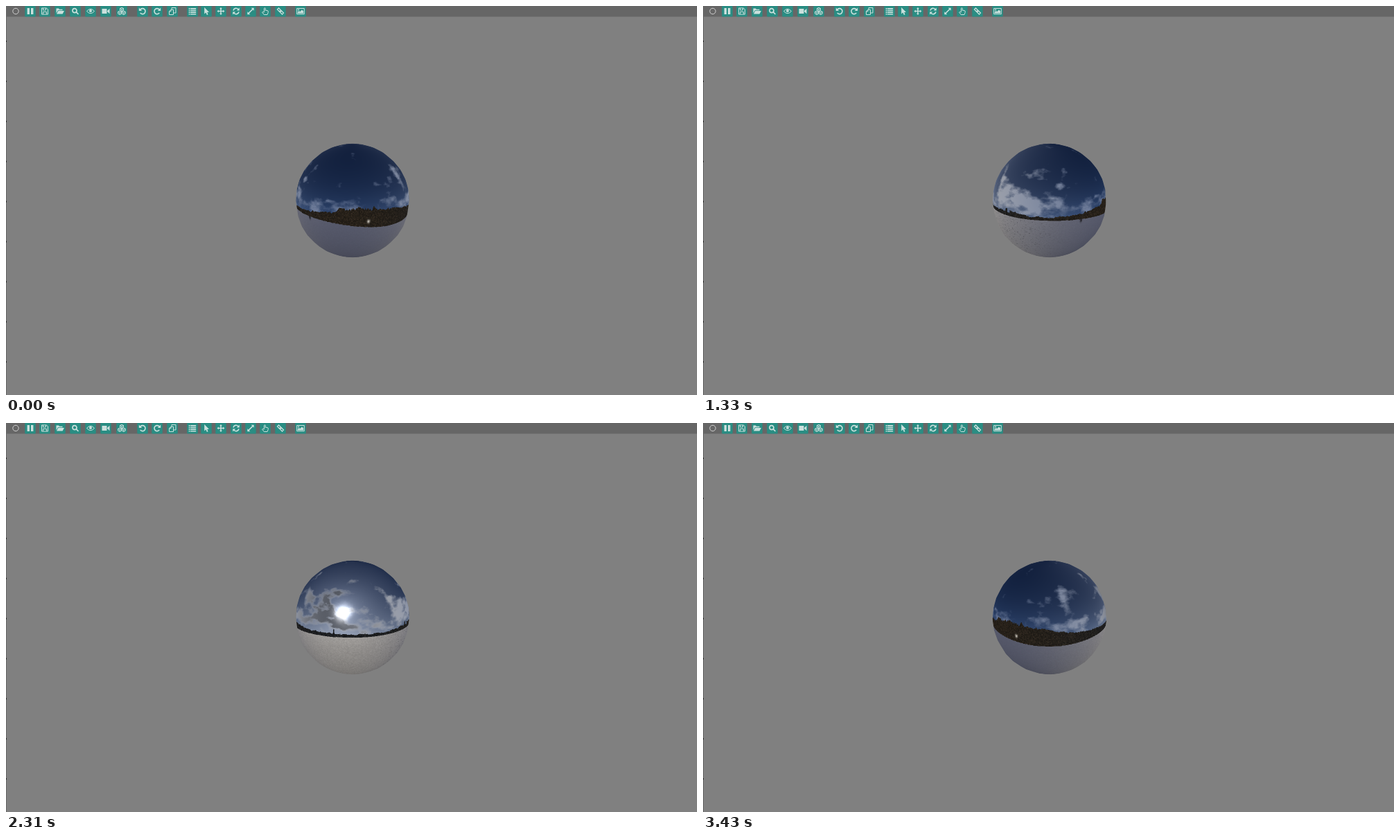
Animation of 997 by 562 pixels, one loop 3500 ms. Source, as an HTML page with a canvas:

```html
<!DOCTYPE html>
<html lang="en">
<head>
<meta charset="utf-8">
<title>Panorama ball</title>
<style>
html, body { margin: 0; width: 100%; height: 100%; overflow: hidden; background: #808080; }
svg, canvas { position: absolute; display: block; }
svg { left: 0; top: 0; }
canvas { left: 416px; top: 197px; }
</style>
</head>
<body>
<svg id="ui" width="997" height="562" viewBox="0 0 997 562">
  <rect width="997" height="15.5" fill="#666"/>
  <rect width="1" height="562" fill="#696969"/>
  <circle cx="14" cy="7.5" r="4.2" fill="none" stroke="#d0d0d0"/>
</svg>
<canvas id="ball" width="168" height="168"></canvas>
<script>
const LOOP = 3500, STEP = 70, RAD = Math.PI / 180;

// ---------- toolbar ----------
const ui = document.getElementById('ui');
const add = (parent, tag, attrs) => {
  const el = document.createElementNS('http://www.w3.org/2000/svg', tag);
  for (const k in attrs) el.setAttribute(k, attrs[k]);
  return parent.appendChild(el);
};
function icon(x, line, fill = '', weight = 1, flip = 1) {
  add(ui, 'rect', { x: x - 7.75, y: 0, width: 15.5, height: 15.5, rx: 1, fill: '#2a8d83' });
  const g = add(ui, 'g', { transform: `translate(${x} 7.5) scale(${flip} 1)` });
  add(g, 'path', { d: line, fill: 'none', stroke: '#cbe0dd', 'stroke-width': weight });
  add(g, 'path', { d: fill, fill: '#cbe0dd' });
}
const dot = (x, y, r) => `M${x - r} ${y}a${r} ${r} 0 1 1 ${2 * r} 0a${r} ${r} 0 1 1 ${-2 * r} 0`;
const cube = (x, y) => `M${x} ${y - 2.6}l2.5 1.2v2.8l-2.5 1.2l-2.5-1.2v-2.8zM${x - 2.5} ${y - 1.4}l2.5 1.2l2.5-1.2M${x} ${y}v2.6`;
const listRow = y => `M-5.3 ${y}h1.8v1.6h-1.8zM-2.8 ${y}h8v1.6h-8z`;
const arc = 'M-3.2-2.3A4 4 0 1 1-3.2 2.5', arcTip = 'M-5.2-5v4.4h4.4z';

icon(35, '', 'M-4.4-4.5h3.4v9h-3.4zM1-4.5h3.4v9H1z');
icon(56, 'M-4.5-4.5h7l2 2v7h-9zM-2.5-4.5v3h4v-3M-2.5 4.5V1h5v3.5');
icon(78, '', 'M-5.5-4h3.5l1 1.2h4.5v1.6H-3L-5.5 3zM-2.6-.6H6L3.6 4H-5z');
icon(100, dot(-1, -.8, 3) + 'M1.4 1.4L4.5 4.5', '', 1.7);
icon(122, 'M-5.5 0Q0-6.4 5.5 0Q0 6.4-5.5 0z', dot(0, -.4, 2));
icon(144, '', 'M-5.5-3.5h7v7h-7zM2-.6L5.5-3.7v7.4L2 .6z');
icon(167, cube(0, -2.6) + cube(-2.8, 2.3) + cube(2.8, 2.3));
icon(197, arc, arcTip, 1.6);
icon(218, arc, arcTip, 1.6, -1);
icon(240, 'M-1-2.5V-5H5V2.5H1.5M-2-2.2h3.5V5h-6V.3zM-2-2.2V.3h-2.5');
icon(269, '', [-4.4, -1.8, .8, 3.4].map(listRow).join(''));
icon(289, '', 'M-2.8-5.5V4L-.5 2L.9 5.4l1.7-.7L1.2 1.4H4z');
icon(310, 'M-4 0H4M0-4V4', 'M0-5.5l2 2.3h-4zM0 5.5l2-2.3h-4zM-5.5 0l2.3-2v4zM5.5 0L3.2-2v4z', 1.5);
icon(332, 'M-4-1A4 4 0 0 1 3-2.8M4 1A4 4 0 0 1-3 2.8', 'M4.8-5v4H.8zM-4.8 5V1h4z', 1.6);
icon(353, 'M-3 3L3-3', 'M4.7-4.7v4L.7-4.7zM-4.7 4.7v-4l4 4z', 1.7);
icon(374, 'M-1.5 1V-4.2q.9-1.2 1.8 0V-1Q1-2 2-.8Q3-1.5 4.2-.3V2L3 5H-1.7L-4.4 1.6Q-3.8 0-1.5 1.6');
icon(396, 'M-4.5-2.5l2-2l3 3l-2 2zM-.5 1.5l2-2l3 3l-2 2z', '', 1.3);
icon(425, 'M-5.3-4H5.3V4.2H-5.3z', 'M-4.2 3V1.2L-2.2-.6L-.8.8L2-2L4.2.2V3z' + dot(-2.8, -2, 1));
for (let y = 50; y < 562; y += 57.9) add(ui, 'rect', { x: 0, y, width: 1, height: 2, fill: '#222' });

// ---------- helpers ----------
const clamp = (v, a = 0, b = 1) => Math.min(b, Math.max(a, v));
const lerp = (a, b, t) => a + (b - a) * t;
const mix = (a, b, t) => a.map((v, i) => lerp(v, b[i], t));
const fade = t => t * t * (3 - 2 * t);
const wrap = d => ((d + 540) % 360 + 360) % 360 - 180;
// smooth hill of height 1 around a direction
const bump = (angle, mid, width) => Math.exp(-((wrap(angle - mid) / width) ** 2));

function hash(x, y, z) {
  let h = Math.imul(x, 374761393) ^ Math.imul(y, 668265263) ^ Math.imul(z, 1442695041);
  h = Math.imul(h ^ h >>> 13, 1274126177);
  return ((h ^ h >>> 16) >>> 0) / 4294967296;
}
function noise(x, y, z) {
  const i = Math.floor(x), j = Math.floor(y), k = Math.floor(z);
  const a = fade(x - i), b = fade(y - j), c = fade(z - k);
  const row = (q, r) => lerp(hash(i, q, r), hash(i + 1, q, r), a);
  return lerp(lerp(row(j, k), row(j + 1, k), b), lerp(row(j, k + 1), row(j + 1, k + 1), b), c);
}
function fbm(x, y, z) {
  let sum = 0, amp = .5;
  for (let o = 0; o < 5; o++, amp /= 2) {
    sum += amp * noise(x, y, z);
    x = x * 2 + 7; y = y * 2 + 3; z = z * 2 + 5;
  }
  return sum / .96875;
}

// ---------- panorama, angles in degrees ----------
const sun = { lon: 172, lat: 20 };
const bigClouds = [
  { lon: 149, lat: 38, w: 18, h: 9 }, { lon: 154, lat: 22, w: 16, h: 8 },
  { lon: 122, lat: 30, w: 13, h: 7 }, { lon: 108, lat: 56, w: 11, h: 6 }, { lon: 62, lat: 35, w: 7, h: 11 }
];

function cloudCover(lon, lat, day) {
  const bank = bump(lat, 9, 8) * (.5 + .35 * day);
  const streaks = .66 * bump(lon, 250, 48) * bump(lat, 23, 13);
  return bigClouds.reduce((sum, c) => sum + .95 * bump(lon, c.lon, c.w) * bump(lat, c.lat, c.h), bank + streaks);
}

function sky(lon, lat, n, day) {
  const zenith = mix([14, 27, 55], [29, 41, 68], day), low = mix([50, 74, 116], [106, 117, 138], day);
  let c = mix(zenith, low, Math.exp(-Math.max(lat, 0) / 24));
  const g = Math.hypot(wrap(lon - sun.lon) * Math.cos(lat * RAD), lat - sun.lat);
  const haze = 95 * Math.exp(-g / 25);
  c = c.map(v => v + haze);
  const thick = clamp((Math.min(cloudCover(lon, lat, day), 1) + (n - .5) * 2.4 - .4) * 1.8);
  const lit = mix([112, 126, 156], [185, 186, 190], day);
  const shade = bump(lon, 160, 42) * thick * thick;
  c = mix(c, mix(lit, [84, 87, 94], shade), thick * .88);
  const glare = 230 * Math.exp(-((g / (4.5 + 4 * n)) ** 2));
  return c.map(v => v + glare);
}

function snow(lon, lat, grain, rough, day) {
  let c = mix([88, 91, 109], [149, 146, 143], day);
  const glow = 16 * bump(lon, sun.lon, 40) * Math.exp(lat / 15);
  const k = (1 - .24 * clamp(-lat / 70)) * (1 + (grain - .5) * (.04 + .1 * day));
  const print = rough > .8 ? .5 * bump(lon, 255, 40) : 0;
  return mix(c.map(v => (v + glow) * k), [62, 62, 68], print);
}

function landTop(lon) {
  const wood = bump(lon, 10, 38);
  const trees = (noise(lon * .35, 2, 9) - .5) * (1 + 4 * wood) + (noise(lon * 1.1, 5, 3) - .5) * (.8 + 1.6 * wood);
  const city = 4.5 * hash(Math.floor(lon / 3), 4, 1) * bump(lon, 247, 14);
  const mast = 5 * bump(lon, 164, .5);
  return .5 + 8.5 * wood + trees + city + mast;
}
const landEnd = lon => -2.4 - 9 * bump(lon, 45, 62);

function land(lon, lat, grain, day) {
  const lamp = bump(lon, 14.6, 1.3) * bump(lat, -3.8, 1.6);
  const wood = mix(mix([28, 24, 19], [66, 54, 41], grain * grain), mix([20, 22, 25], [50, 52, 54], grain * grain), day);
  return mix(wood, [205, 200, 190], lamp);
}

const TW = 900, TH = 450, tex = new Uint8ClampedArray(TW * TH * 3);
for (let i = 0; i < TW; i++) {
  const lon = (i + .5) * 360 / TW, day = .5 + .5 * Math.cos((lon - sun.lon) * RAD);
  const top = landTop(lon), end = landEnd(lon);
  for (let j = 0; j < TH; j++) {
    const lat = 90 - (j + .5) * 180 / TH, r = Math.cos(lat * RAD);
    const x = r * Math.sin(lon * RAD), y = Math.sin(lat * RAD), z = r * Math.cos(lon * RAD);
    const grain = noise(x * 90, y * 90, z * 90);
    let c;
    if (lat > top) c = sky(lon, lat, fbm(x * 5, y * 8, z * 5), day);
    else if (lat > end) c = land(lon, lat, grain, day);
    else c = snow(lon, lat, grain, noise(x * 45, y * 110, z * 45), day);
    const walker = bump(lon, 316, 1) * bump(lat, -4.5, 2);
    tex.set(mix(c, [24, 23, 26], walker), (j * TW + i) * 3);
  }
}

// ---------- ball ----------
const R = 82.3, MID = 84, DIST = 8.3, TILT = 16 * RAD;
const CT = Math.cos(TILT), ST = Math.sin(TILT), ZOOM = Math.sqrt(DIST * DIST - 1);
const SIZE = 336;
const shot = document.createElement('canvas');
shot.width = shot.height = SIZE;
const shotCtx = shot.getContext('2d'), image = shotCtx.createImageData(SIZE, SIZE);
const ctx = document.getElementById('ball').getContext('2d');
ctx.imageSmoothingQuality = 'high';

// longitude and texture row seen by each pixel, before rotation
const rays = [];
for (let p = 0; p < SIZE * SIZE; p++) {
  const sx = ((p % SIZE + .5) / 2 - MID) / R / ZOOM, sy = ((Math.floor(p / SIZE) + .5) / 2 - MID) / R / ZOOM;
  const a = 1 + sx * sx + sy * sy, disc = DIST * DIST - a * (DIST * DIST - 1);
  if (disc < 0) continue;
  const q = (DIST - Math.sqrt(disc)) / a, X = sx * q, up = -sy * q, Z = DIST - q;
  const lat = Math.asin(up * CT + Z * ST), lon = Math.atan2(X, Z * CT - up * ST);
  rays.push({ p: p * 4, lon: lon / RAD, row: clamp(Math.floor((.5 - lat / Math.PI) * TH), 0, TH - 1) * TW });
}

function project(lon, lat) {
  const y = Math.sin(lat), z = Math.cos(lat) * Math.cos(lon);
  const k = R * ZOOM / (DIST - z * CT - y * ST);
  return [MID + k * Math.cos(lat) * Math.sin(lon), MID - k * (y * CT - z * ST)];
}
// outline of the coarse mesh: every facet that faces the viewer
function meshPath(rot) {
  const path = new Path2D(), cols = 20, rows = 16;
  const at = (i, j) => project(i * 2 * Math.PI / cols + rot * RAD, j * Math.PI / rows - Math.PI / 2);
  for (let i = 0; i < cols; i++) for (let j = 0; j < rows; j++) {
    const q = [at(i, j), at(i + 1, j), at(i + 1, j + 1), at(i, j + 1)];
    const area = q.reduce((s, [x, y], n) => s + x * q[(n + 1) % 4][1] - y * q[(n + 1) % 4][0], 0);
    if (area >= 0) continue;
    q.forEach(([x, y], n) => n ? path.lineTo(x, y) : path.moveTo(x, y));
    path.closePath();
  }
  return path;
}

// the spin builds up against drag to a steady speed, in degrees per second
const SPEED = 127, DRAG = .95, DELAY = .04;
function rotation(ms) {
  const t = Math.max(0, ms / 1000 - DELAY);
  return SPEED * (t - DRAG * (1 - Math.exp(-t / DRAG)));
}

function draw(ms) {
  const rot = rotation(ms), data = image.data;
  for (const { p, lon, row } of rays) {
    const u = Math.floor(((lon - rot + 720) % 360) * TW / 360), k = (row + u) * 3;
    data[p] = tex[k]; data[p + 1] = tex[k + 1]; data[p + 2] = tex[k + 2]; data[p + 3] = 255;
  }
  shotCtx.putImageData(image, 0, 0);
  ctx.clearRect(0, 0, 168, 168);
  ctx.save();
  ctx.clip(meshPath(rot));
  ctx.drawImage(shot, 0, 0, 168, 168);
  ctx.restore();
}

let last = -1;
function tick() {
  const t = Math.floor(performance.now() % LOOP / STEP) * STEP;
  if (t !== last) draw(last = t);
  requestAnimationFrame(tick);
}
tick();
</script>
</body>
</html>
```
